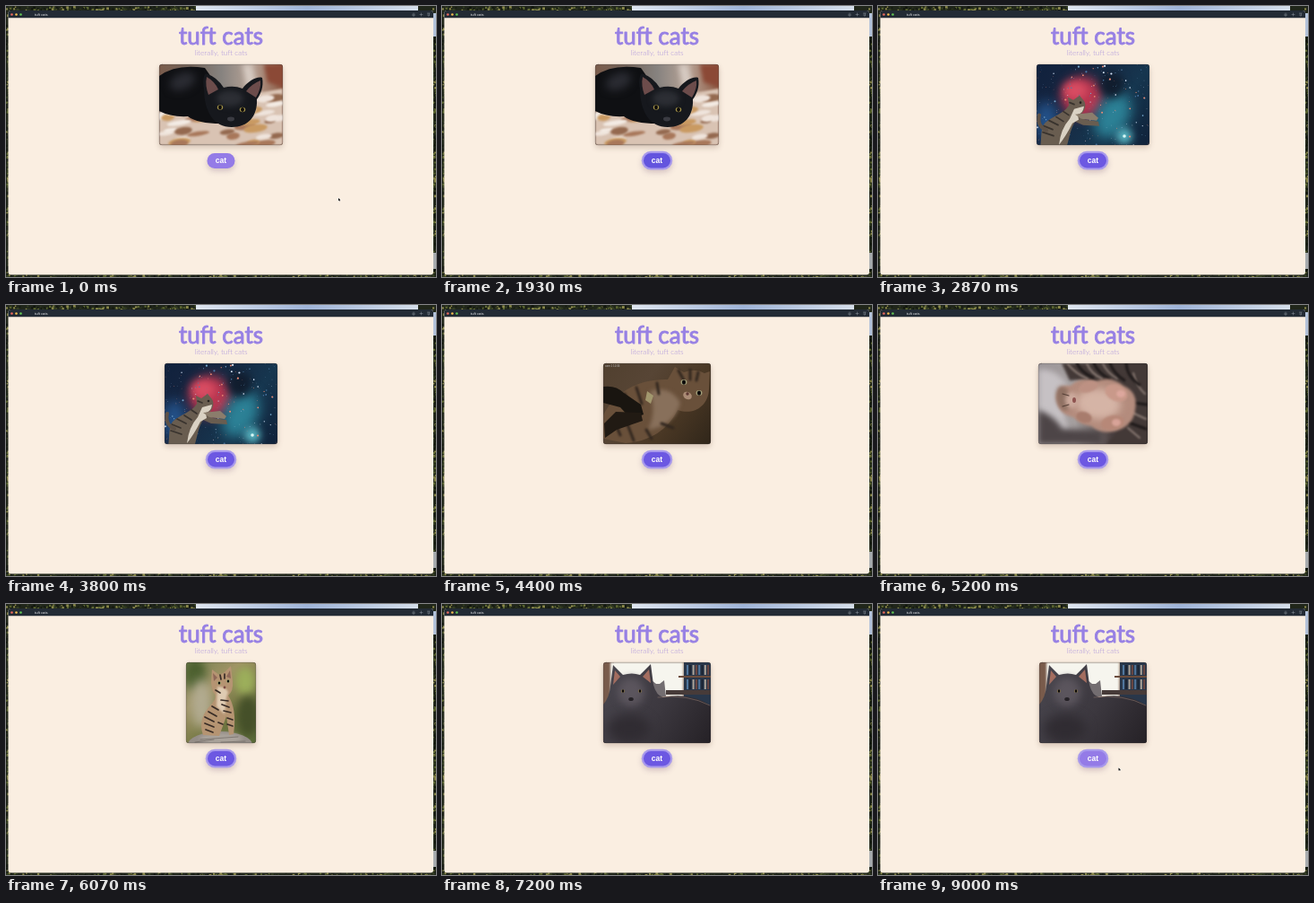
Write an HTML page with a canvas that moves like this. It is 480 px wide and 302 px high and loops after 9.59 s.

```html
<!DOCTYPE html>
<html lang="en">
<head>
<meta charset="utf-8">
<title>tuft cats</title>
<style>
html, body { margin: 0; width: 100%; height: 100%; overflow: hidden; }
canvas { display: block; width: 480px; height: 302px; }
</style>
</head>
<body>
<canvas id="stage" width="480" height="302"></canvas>
<script>
const LOOP = 9590;
const NAME = 'tuft cats';
const ctx = document.getElementById('stage').getContext('2d');

function random(seed) {
  return () => (seed = (seed * 16807) % 2147483647) / 2147483647;
}
function fill(color, path, blur = 0) {
  ctx.filter = blur ? `blur(${blur}px)` : 'none';
  ctx.fillStyle = color;
  ctx.fill(new Path2D(path));
  ctx.filter = 'none';
}
function line(color, width, path, blur = 0) {
  ctx.filter = blur ? `blur(${blur}px)` : 'none';
  ctx.strokeStyle = color;
  ctx.lineWidth = width;
  ctx.lineCap = ctx.lineJoin = 'round';
  ctx.stroke(new Path2D(path));
  ctx.filter = 'none';
}
function oval(color, x, y, rx, ry = rx, turn = 0, blur = 0) {
  ctx.filter = blur ? `blur(${blur}px)` : 'none';
  ctx.fillStyle = color;
  ctx.beginPath();
  ctx.ellipse(x, y, rx, ry, turn, 0, 7);
  ctx.fill();
  ctx.filter = 'none';
}
function rect(color, x, y, w, h) {
  ctx.fillStyle = color;
  ctx.fillRect(x, y, w, h);
}
function pill(color, x, y, w, h, r) {
  ctx.fillStyle = color;
  ctx.beginPath();
  ctx.roundRect(x, y, w, h, r);
  ctx.fill();
}
function gradient(x0, y0, x1, y1, ...colors) {
  const g = ctx.createLinearGradient(x0, y0, x1, y1);
  colors.forEach((c, i) => g.addColorStop(i / (colors.length - 1), c));
  return g;
}
function text(string, x, y, font, color, align = 'center') {
  ctx.font = font;
  ctx.fillStyle = color;
  ctx.textAlign = align;
  ctx.fillText(string, x, y);
}
function withShadow(color, blur, dy, draw) {
  ctx.save();
  ctx.shadowColor = color;
  ctx.shadowBlur = blur;
  ctx.shadowOffsetY = dy;
  draw();
  ctx.restore();
}
function eye(x, y, r, color) {
  oval(color, x, y, r, r * 0.85);
  oval('#0c0a0a', x, y, r * 0.6, r * 0.75);
}

function blackCat() {
  rect(gradient(171, 0, 309, 0, '#7a5c4c', '#75655b', '#86827f', '#b8a497', '#8d5a44'), 171, 65, 138, 90);
  fill('#d8cdc5', 'M264 65h10l8 36h-11z', 3);
  fill('#8b4936', 'M288 65h22v26l-18-6z', 2);
  fill('#d9c3b3', 'M171 118L222 108L280 97L309 92V155H171Z', 1);
  const rnd = random(41), tones = ['#f3ebe4', '#a8775a', '#efe4dc', '#c99a62', '#94694f'];
  for (let i = 0; i < 44; i++) {
    oval(tones[i % 5], 171 + rnd() * 138, 102 + rnd() * 53, 6 + rnd() * 8, 2 + rnd() * 2.5, -0.15, 0.8);
  }
  fill('#0f1013', 'M171 78Q190 64 222 69L234 86L240 131Q214 131 203 123Q184 124 171 117Z', 0.7);
  oval('#2b2c33', 197, 84, 15, 9, -0.4, 5);
  fill('#16181d', 'M221 92C219 82 221 73 225 76Q235 79 243 91Q254 88 264 92C270 84 280 78 286 80C288 90 284 99 280 104C281 123 270 135 252 135C232 135 221 118 221 92Z', 0.3);
  fill('#6c4c4b', 'M224 79Q233 84 237 93L226 99Q222 88 224 79Z', 0.5);
  fill('#6c4c4b', 'M284 83Q274 87 268 95L279 102Q285 92 284 83Z', 0.5);
  oval('#2c2e34', 250, 103, 15, 9, 0, 3);
  eye(239, 113, 3.2, '#a39348');
  eye(264, 115.5, 3.2, '#a39348');
  oval('#3a3b42', 251, 126, 4, 2.4, 0, 0.6);
}

function spaceCat(t) {
  rect(gradient(177, 65, 303, 155, '#10213d', '#172640', '#16364f', '#102139'), 177, 65, 126, 90);
  oval('#b93650', 228, 102, 24, 23, 0.4, 6);
  oval('#d84c62', 220, 94, 13, 10, 0, 4);
  oval('#2c8196', 262, 122, 18, 27, 0.5, 7);
  oval('#111d2e', 261, 88, 13, 14, 0, 5);
  oval('#58b5c2', 275, 145, 9, 9, 0, 4);
  oval('#24528a', 188, 128, 13, 22, 0, 7);
  const rnd = random(77), tones = ['#dbeaff', '#74a5cc', '#ed8b74', '#4b7aa8'];
  for (let i = 0; i < 230; i++) {
    const r = 0.25 + rnd() ** 5 * 0.9;
    oval(tones[i % 4], 177 + rnd() * 126, 65 + rnd() * 90, r);
  }
  oval('#d6f8f6', 275, 145, 1.8);
  ctx.save();
  ctx.translate(0, 1.5 * Math.sin((t - 3800) / 260));
  fill('#695d50', 'M181 158C183 144 181 137 186 130C194 122 207 120 213 110L212 101L218 104L225 99L230 105C233 110 231 117 226 120L231 126L246 128L247 133L229 132L220 128C214 138 214 146 210 158Z');
  fill('#d9d1c3', 'M219 114L230 111Q229 119 223 120L224 126L217 130Q210 144 202 154Q204 136 214 125Z');
  fill('#8b7d6c', 'M220 120L239 118L246 124L244 127L227 125Z');
  line('#39332e', 1.7, 'M185 133L195 137M184 140L196 144M191 127L201 132M199 123L207 128M207 117L213 121M214 107L219 109', 0.4);
  line('#5d5147', 4, 'M188 138Q177 133 180 121');
  oval('#25211e', 226, 107, 1.3);
  ctx.restore();
}

function tabbyCat(t) {
  rect(gradient(180, 65, 300, 155, '#51402f', '#574535', '#493724', '#30261a'), 180, 65, 120, 90);
  ctx.save();
  ctx.translate(0, Math.sin((t - 4400) / 180));
  fill('#69503a', 'M180 123C193 96 221 82 252 83L260 69L270 75Q283 70 293 76L299 74L298 94C297 114 280 123 263 117Q246 151 205 154L180 149Z', 0.7);
  fill('#88705b', 'M232 96Q255 89 266 109Q259 135 230 139Q240 118 232 96Z', 2);
  line('#32271f', 3, 'M217 92L223 110M204 99L212 118M240 87L242 99M245 132L258 137M228 139L234 149M207 133L214 151M192 129L199 145M264 73L270 84M277 72L277 83M286 75L284 84', 0.8);
  fill('#191510', 'M180 91Q194 89 203 98L222 111L225 122L211 127L199 114L180 109Z', 0.5);
  fill('#211a13', 'M181 132L194 119L222 120L224 129L195 139L182 148Z', 0.5);
  fill('#a2986e', 'M229 96L236 101L233 110L227 106Z');
  eye(270, 86, 3.5, '#a19e78');
  eye(287, 98, 3.5, '#a19e78');
  oval('#aa8b75', 274, 101, 5, 4, 0.5, 0.6);
  oval('#5c3832', 274, 99, 1.7);
  ctx.restore();
  text('cam 1 12:04', 182, 68.5, '3px "Liberation Sans", sans-serif', '#bbb', 'left');
}

function kitten(t) {
  rect(gradient(179, 0, 301, 0, '#9a9497', '#a59f9f', '#4a4040', '#2d2726'), 179, 65, 122, 90);
  fill('#c6c1c4', 'M179 72Q200 70 212 91Q203 121 214 140L196 148Q188 125 179 114Z', 3);
  fill('#4d4547', 'M179 118Q196 122 206 138L250 140V155H179Z', 3);
  fill('#433937', 'M205 65H301V155H255Q282 129 276 102Q242 80 214 84Z', 1.5);
  line('#8a7b74', 2, 'M212 66Q221 77 234 82M233 65Q238 77 250 82M251 65Q255 75 267 82M285 76Q289 91 298 99M284 120L299 127M279 137L292 148', 1);
  line('#1f1a1a', 3, 'M222 65Q227 75 240 81M241 65Q246 76 258 82M259 65Q263 76 275 84M277 65Q278 80 292 89M300 111L286 109M299 138L277 130', 1);
  ctx.save();
  ctx.translate(0, 0.7 * Math.sin((t - 5200) / 170));
  fill('#b48c7d', 'M199 104Q200 88 215 90Q225 79 243 85Q260 78 274 90Q291 97 287 117Q285 134 267 140Q250 145 238 135Q225 133 218 125Q201 122 199 104Z', 1.5);
  oval('#d5b4a6', 246, 110, 25, 17, 0.1, 4);
  oval('#8f7163', 207, 104, 8, 14, -0.2, 2);
  oval('#ccaa9d', 216, 106, 7, 9, 0, 2);
  oval('#bd9183', 235, 91, 11, 6, -0.3, 1);
  oval('#c9998a', 266, 98, 13, 9, 0.4, 1);
  oval('#b78878', 262, 131, 13, 8, -0.2, 1);
  oval('#a87c6d', 230, 125, 9, 6, 0.3, 1);
  oval('#dca79d', 271, 99, 5, 4, 0, 0.8);
  oval('#d8a398', 266, 131, 5, 4, 0, 0.8);
  line('#553f36', 1.2, 'M206 99L213 101M206 113L213 111', 0.4);
  oval('#8f5350', 219, 106, 2, 3, 0, 0.5);
  ctx.restore();
}

function sittingCat() {
  rect(gradient(201, 65, 279, 155, '#748052', '#a09365', '#6f7540', '#596c39'), 201, 65, 78, 90);
  oval('#4c602f', 211, 78, 12, 18, 0, 5);
  oval('#b2ab90', 218, 111, 12, 27, 0, 6);
  oval('#9caf5b', 267, 86, 11, 16, 0, 5);
  oval('#455029', 270, 125, 13, 23, 0, 5);
  oval('#948d87', 239, 157, 36, 15);
  oval('#aaa39b', 240, 150, 24, 6, 0, 2);
  fill('#b59472', 'M229 88L230 73L238 79L244 76L251 69L253 86Q254 97 248 102Q258 117 254 145L249 146L246 125L238 147L220 146C215 132 220 121 230 111Q237 103 231 98Z');
  fill('#dfcbb2', 'M236 92Q245 92 248 98L246 104L244 123L235 114Z', 1);
  fill('#8f6858', 'M231 77L236 82L232 86ZM250 74L251 83L246 81Z');
  line('#382c26', 1.7, 'M230 114L237 118M226 120L235 125M222 126L232 131M222 133L232 137M223 140L231 143M240 107L248 108M241 112L249 115M243 119L251 121M247 127L253 129M247 134L253 136M237 132L242 134M234 96L239 99M239 79L240 84M244 78L244 83', 0.4);
  eye(238, 88, 2, '#99a36c');
  eye(248, 86, 2, '#99a36c');
  oval('#7a4a42', 244, 93, 1.4);
  line('#655f59', 0.6, 'M217 151L259 148M211 154L232 151M240 154L267 153');
}

function greyCat() {
  rect(gradient(180, 65, 180, 155, '#b6a390', '#82675b', '#30282b'), 180, 65, 120, 90);
  rect('#795b4b', 180, 65, 12, 48);
  fill('#f6f5ee', 'M188 65H269V103H188Z', 1);
  rect('#29374a', 270, 65, 30, 48);
  for (let i = 0; i < 16; i++) {
    rect(['#50769c', '#1b2432', '#aaa399', '#6b4641'][i % 4], 273 + (i % 8) * 3.3, i < 8 ? 68 : 84, 2, 11);
  }
  rect('#6b4c3c', 264, 80, 36, 2);
  rect('#473b39', 250, 96, 50, 5);
  fill('#736d70', 'M233 103L234 85L239 89L243 89L248 85L250 103Z', 0.5);
  fill(gradient(185, 80, 300, 155, '#48454d', '#3c383f', '#252126'), 'M180 112Q187 104 188 91L191 68L202 79Q212 76 221 79L233 67L236 90Q239 102 247 104Q276 98 300 113V155H180Z', 0.5);
  fill('#a56e60', 'M193 74L199 81L191 90ZM231 73L233 88L224 81Z', 0.5);
  oval('#5b555d', 211, 98, 15, 16, 0, 4);
  oval('#302c32', 209, 139, 24, 16, 0, 6);
  line('#89736b', 0.6, 'M241 104Q274 100 299 113');
  eye(202, 97, 2.2, '#8a7954');
  eye(221, 97, 2.2, '#8a7954');
  oval('#252126', 211, 106, 2.8, 2);
}

// start time, left edge, width, painter
const pictures = [
  [0, 171, 138, blackCat],
  [2270, 177, 126, spaceCat],
  [4270, 180, 120, tabbyCat],
  [4800, 179, 122, kitten],
  [5330, 201, 78, sittingCat],
  [7070, 180, 120, greyCat],
];

function foliage(x, y, w, h, count) {
  rect('#20261a', x, y, w, h);
  const rnd = random(9), tones = ['#11150e', '#5d6832', '#343e22', '#8c8a4c', '#161b12'];
  for (let i = 0; i < count; i++) {
    const size = 1 + rnd() * 2;
    rect(tones[i % 5], x + rnd() * w, y + rnd() * h, size, size);
  }
}

function desktop() {
  foliage(0, 0, 480, 302, 0);
  foliage(0, 0, 212, 5, 200);
  foliage(0, 0, 3, 302, 200);
  foliage(476, 0, 4, 302, 200);
  foliage(0, 299, 480, 3, 260);
  rect(gradient(212, 0, 460, 0, '#dfe6f0', '#9fb4d8', '#d5deea'), 212, 0, 248, 6);
  rect('#b3c2da', 476, 8, 4, 26);
  rect('#a9adb0', 476, 275, 4, 18);
}

function appWindow() {
  pill('#faeee1', 2.5, 5, 474.5, 294.5, 3);
  pill('#232b35', 2.5, 5, 474.5, 8.3, [3, 3, 0, 0]);
  ['#ee6a5f', '#f5bd4f', '#61c554'].forEach((c, i) => oval(c, 6.5 + i * 5, 9.5, 1.3));
  text(NAME, 32, 11, '4.2px "Liberation Sans", sans-serif', '#e5e7ea', 'left');
  line('#8d959e', 0.5, 'M454 9v2h2V9M455 10V8M462 9.5h3M463.5 8v3M470.5 8h2.5M471 8.5v2.5h1.5v-2.5');
  // rounded stroke softens the letter ends
  ctx.lineWidth = 0.9;
  ctx.lineJoin = 'round';
  ctx.strokeStyle = '#9780e4';
  text(NAME, 240, 42.8, '400 26px Lato, sans-serif', '#9780e4');
  ctx.strokeText(NAME, 240, 42.8);
  text('literally, ' + NAME, 240, 54.6, '300 8.4px Lato, sans-serif', '#ac94dc');
}

function picture(t) {
  const [, x, w, paint] = pictures.findLast(p => t >= p[0]);
  withShadow('rgba(110,80,60,.28)', 6, 3, () => pill('#776c65', x, 65, w, 90, 3));
  ctx.save();
  ctx.beginPath();
  ctx.roundRect(x, 65, w, 90, 3);
  ctx.clip();
  paint(t);
  ctx.restore();
  ctx.strokeStyle = 'rgba(70,65,65,.5)';
  ctx.lineWidth = 0.6;
  ctx.beginPath();
  ctx.roundRect(x + 0.2, 65.2, w - 0.4, 89.6, 3);
  ctx.stroke();
}

function button(t) {
  const color = t < 1330 || t >= 8400 ? '#947be7' : t < 2270 ? '#6354de' : '#6c58e2';
  const focused = t >= 1330;
  withShadow('rgba(110,80,110,.28)', 6, 3, () =>
    focused ? pill('#a899ec', 222.8, 161.8, 34.4, 20.8, 10.4) : pill(color, 224.5, 164, 31, 17, 8.5));
  if (focused) pill(color, 225, 164, 30, 16.5, 8.2);
  text('cat', 240, 175, '700 8.6px "Liberation Sans", sans-serif', '#fff');
}

function ease(t, from, to) {
  const p = Math.min(1, Math.max(0, (t - from) / (to - from)));
  return p * p * (3 - 2 * p);
}

function cursor(t) {
  if (t >= 1330 && t < 8100) return; // white pointer vanishes against the label
  const enter = ease(t, 0, 1130), leave = ease(t, 7870, 8800);
  ctx.save();
  ctx.translate(371 - 129 * enter + 26.5 * leave, 214 - 42 * enter + 10.5 * leave);
  const arrow = 'M0 0v3.2l.8-.7.6 1.1.6-.3-.5-1.1h1z';
  line('#fff', 0.5, arrow);
  fill('#111', arrow);
  ctx.restore();
}

function draw(now) {
  const t = now % LOOP;
  desktop();
  appWindow();
  picture(t);
  button(t);
  cursor(t);
  requestAnimationFrame(draw);
}
requestAnimationFrame(draw);
</script>
</body>
</html>
```
